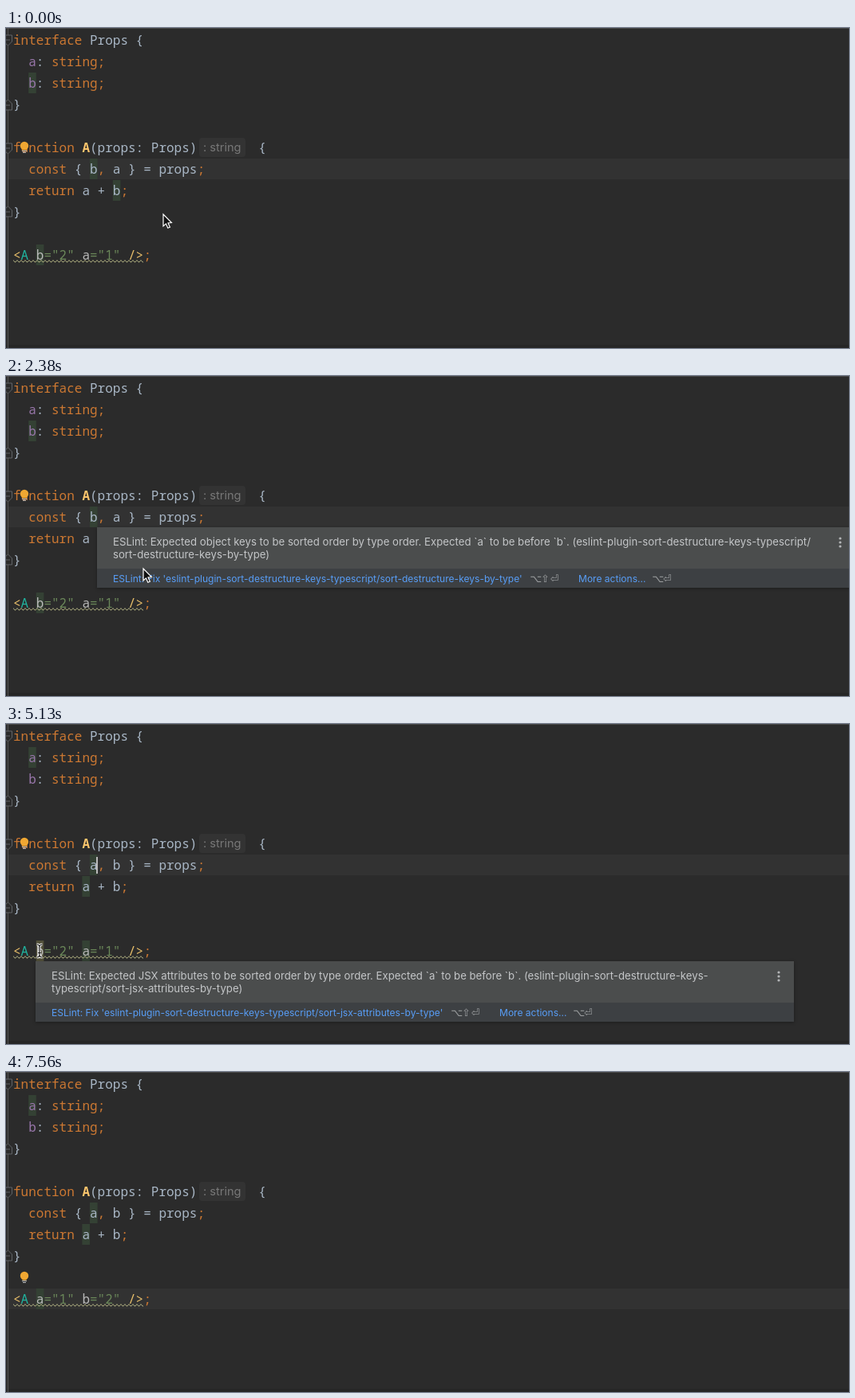
These frames come from a looping animation (1056x402 px, 7750 ms). An HTML page with a canvas:

```html
<!DOCTYPE html>
<html lang="en">
<head>
<meta charset="utf-8">
<title>Sorting keys by type</title>
<style>
html, body { margin: 0; width: 100%; height: 100%; overflow: hidden; background: #2b2b2b; }
canvas { display: block; }
</style>
</head>
<body>
<canvas id="stage" width="1056" height="402"></canvas>
<script>
const ctx = document.getElementById('stage').getContext('2d');
const LOOP = 7750, CELL = 9.6, ROW = 27, LEFT = 9;
const MONO = '16px "Noto Sans Mono", monospace';
const UI = 'Inter, sans-serif';
const C = {
  bg: '#2b2b2b', row: '#323232', text: '#a9b7c6', key: '#cc7832', field: '#9876aa',
  fn: '#ffc66d', str: '#6a8759', tag: '#e8bf6a', comp: '#20b5a0', attr: '#bababa',
  mark: '#344134', weak: '#52503a', link: '#589df6', press: '#c47a33', hint: '#787878'
};

// moments of the loop, in ms
const T = {
  beam: 120, lampOff: 940, popA: 1440, press1: 3440, closeA: 3560, fix1: 3690,
  popB: 5000, press2: 6380, closeB: 6500, fix2: 6620, away: 6810, lamp2: 7190, caretOff: 7560
};

// pointer hot spot: time, x, y
const PATH = [
  [60, 197, 234], [810, 119, 181], [1250, 112, 176], [2130, 112, 176], [2380, 172, 242],
  [2700, 179, 251], [3690, 179, 251], [4190, 38, 274], [4310, 31, 279], [4630, 42, 285],
  [5380, 42, 285], [6130, 122, 357], [6500, 122, 357], [6810, 126, 376]
];

const within = (t, a, b) => t >= a && t < b;

function pointer(t) {
  if (t <= PATH[0][0]) return PATH[0].slice(1);
  for (let i = 1; i < PATH.length; i++) {
    const [t0, x0, y0] = PATH[i - 1], [t1, x1, y1] = PATH[i];
    if (t <= t1) {
      const u = (t - t0) / (t1 - t0), e = u * u * (3 - 2 * u);
      return [x0 + (x1 - x0) * e, y0 + (y1 - y0) * e];
    }
  }
  return PATH[PATH.length - 1].slice(1);
}

function rect(x, y, w, h, color) {
  ctx.fillStyle = color;
  ctx.fillRect(x, y, w, h);
}

function text(str, x, y, color, font) {
  ctx.font = font;
  ctx.fillStyle = color;
  ctx.fillText(str, x, y);
}

function poly(points, fill, stroke, width) {
  ctx.beginPath();
  points.forEach(([x, y]) => ctx.lineTo(x, y));
  ctx.closePath();
  if (fill) { ctx.fillStyle = fill; ctx.fill(); }
  if (stroke) { ctx.strokeStyle = stroke; ctx.lineWidth = width; ctx.stroke(); }
}

function mark(col, row, color = C.mark) {
  rect(LEFT + col * CELL, row * ROW + 2, CELL, 26, color);
}

// tokens: alternating string and colour name, "!" makes it bold
function code(row, col, ...tokens) {
  for (let i = 0; i < tokens.length; i += 2) {
    const bold = tokens[i + 1].endsWith('!');
    text(tokens[i], LEFT + col * CELL, row * ROW + 21,
      C[tokens[i + 1].replace('!', '')], (bold ? 'bold ' : '500 ') + MONO);
    col += tokens[i].length;
  }
}

function fold(y, dir) {
  poly([[-3, y - 6 * dir], [7.5, y - 6 * dir], [7.5, y + 2 * dir], [2.5, y + 7 * dir], [-3, y + 2 * dir]],
    C.bg, '#606366', 1);
  rect(0, y - 0.5, 5, 1, '#606366');
}

function lamp(y) {
  ctx.fillStyle = '#f0a732';
  ctx.beginPath();
  ctx.arc(23, y - 1, 5.2, 0, 7);
  ctx.fill();
  rect(20.5, y + 2, 5, 2.5, '#f0a732');
  rect(20, y + 5, 6, 1, '#b8bcc0');
  rect(21, y + 7, 4, 1, '#b8bcc0');
}

function wave(x0, x1, y) {
  ctx.beginPath();
  for (let x = x0; x <= x1; x++) ctx.lineTo(x, y - 1.3 * Math.cos((x - x0) * Math.PI / 2.5));
  ctx.strokeStyle = '#aeae80';
  ctx.lineWidth = 1;
  ctx.stroke();
}

function editor(t) {
  const fixed = t >= T.fix1, done = t >= T.fix2;
  const [p, q] = fixed ? 'ab' : 'ba';
  const [m, n] = done ? 'ab' : 'ba';
  const value = { a: '="1"', b: '="2"' };

  rect(0, 0, 1056, 402, C.bg);
  rect(3, (done ? 10 : 6) * ROW + 2, 1053, 26, C.row);
  rect(0, 0, 1056, 1, '#484848');
  rect(0, 398, 1056, 4, '#262626');
  rect(2, 0, 1, 402, '#555555');
  fold(15, 1);
  fold(97, -1);
  fold(151, 1);
  fold(231, -1);

  mark(2, fixed ? 1 : 2);
  mark(10, 6);
  mark(fixed ? 9 : 13, 7);
  mark(3, 10, fixed && !done ? C.weak : C.mark);
  if (fixed && !done) mark(9, 10);

  code(0, 0, 'interface', 'key', ' Props {', 'text');
  code(1, 2, 'a', 'field', ': ', 'text', 'string;', 'key');
  code(2, 2, 'b', 'field', ': ', 'text', 'string;', 'key');
  code(3, 0, '}', 'text');
  code(5, 0, 'function ', 'key', 'A', 'fn!', '(props: Props)', 'text');
  ctx.fillStyle = '#333333';
  ctx.beginPath();
  ctx.roundRect(242, 138, 58, 24, 4);
  ctx.fill();
  text(': string', 247, 155, C.hint, '14.6px ' + UI);
  code(5, 32, '{', 'text');
  code(6, 2, 'const', 'key', ' { ' + p, 'text', ',', 'key', ' ' + q + ' } = props', 'text', ';', 'key');
  code(7, 2, 'return', 'key', ' a + b', 'text', ';', 'key');
  code(8, 0, '}', 'text');
  code(10, 0, '<', 'tag', 'A ', 'comp', m, 'attr', value[m] + ' ', 'str',
    n, 'attr', value[n], 'str', ' />', 'tag', ';', 'key');
  wave(9, 172, 293);

  if (within(t, T.fix1, T.fix2)) rect(113, 167, 2, 21, '#bbbbbb');
  if (within(t, T.fix2, T.caretOff)) rect(47, 275, 2, 21, '#bbbbbb');
  if (t >= T.lamp2) lamp(257);
  else if (!done && !within(t, T.lampOff, T.popA)) lamp(149);
}

// each key symbol is centred in its own cell
function keys(str, x, y) {
  ctx.textAlign = 'center';
  [...str].forEach((ch, i) => text(ch, x + 5.8 + i * 11.7, y, '#9a9c9e', '13px "DejaVu Sans", sans-serif'));
  ctx.textAlign = 'left';
}

function popup(x, y, lines, link, linkWidth, state, alpha) {
  ctx.save();
  ctx.globalAlpha = alpha;
  ctx.shadowColor = 'rgba(0,0,0,.35)';
  ctx.shadowBlur = 4;
  ctx.shadowOffsetY = 1;
  rect(x, y, 950, 76, '#4b4d4d');
  ctx.shadowColor = 'transparent';
  rect(x, y + 52, 950, 24, '#3d4043');
  lines.forEach((s, i) => text(s, x + 20, y + 23 + i * 16, '#c4c6c8', '13.2px ' + UI));
  const small = '12.05px ' + UI, color = state === 'press' ? C.press : C.link;
  text(link, x + 20, y + 69, color, small);
  if (state) rect(x + 20, y + 71, ctx.measureText(link).width, 1, color);
  keys('⌥⇧⏎', x + linkWidth + 31, y + 69);
  text('More actions...', x + linkWidth + 90, y + 69, C.link, small);
  keys('⌥⏎', x + linkWidth + 184, y + 69);
  ctx.fillStyle = '#b4b6b8';
  for (const dy of [14, 19, 24]) {
    ctx.beginPath();
    ctx.arc(x + 931, y + dy, 1.6, 0, 7);
    ctx.fill();
  }
  ctx.restore();
}

const cursors = {
  arrow() {
    poly([[0, 0], [0, 15], [3.4, 11.9], [5.8, 17.3], [8.4, 16.2], [6, 11], [10.4, 10.6]], '#111', '#fff', 1.2);
  },
  beam() {
    const draw = (color, width) => {
      ctx.strokeStyle = color;
      ctx.lineWidth = width;
      ctx.beginPath();
      for (const s of [-1, 1]) {
        ctx.moveTo(-3.5, 8 * s);
        ctx.quadraticCurveTo(0, 8 * s, 0, 5 * s);
        ctx.quadraticCurveTo(0, 8 * s, 3.5, 8 * s);
      }
      ctx.moveTo(0, -6);
      ctx.lineTo(0, 6);
      ctx.moveTo(-2, 2.5);
      ctx.lineTo(2, 2.5);
      ctx.stroke();
    };
    draw('#fff', 3.2);
    draw('#111', 1.2);
  },
  hand() {
    ctx.lineJoin = 'round';
    poly([[-1.6, 0.5], [0, -0.6], [1.6, 0.5], [2.2, 5], [4, 4.4], [5, 5.6], [6.8, 5.2], [7.6, 6.6],
      [9, 6.6], [9.6, 8], [8.8, 12], [7.6, 15.5], [0.8, 15.5], [-1.6, 12.2], [-4.4, 9.2],
      [-4, 7.6], [-2.4, 7.8], [-0.8, 9.2]], '#fff', '#111', 1.1);
    for (const x of [2.2, 4.2, 6.2]) rect(x, 10, 0.8, 3.5, '#111');
  }
};

function draw(t) {
  const [x, y] = pointer(t);
  const showA = within(t, T.popA, T.closeA), showB = within(t, T.popB, T.closeB);
  const hover = (showA && y > 247) || (showB && y > 350);
  const state = !hover ? '' : within(t, T.press1, T.closeA) || t >= T.press2 ? 'press' : 'hover';
  const fade = start => Math.min(1, 0.4 + (t - start) / 150);
  const plugin = 'eslint-plugin-sort-destructure-keys-typescript/';

  editor(t);
  if (showA) popup(114, 190, [
    'ESLint: Expected object keys to be sorted order by type order. Expected `a` to be before `b`. (' + plugin,
    'sort-destructure-keys-by-type)'
  ], "ESLint: Fix '" + plugin + "sort-destructure-keys-by-type'", 513, state, fade(T.popA));
  if (showB) popup(37, 298, [
    'ESLint: Expected JSX attributes to be sorted order by type order. Expected `a` to be before `b`. (eslint-plugin-sort-destructure-keys-',
    'typescript/sort-jsx-attributes-by-type)'
  ], "ESLint: Fix '" + plugin + "sort-jsx-attributes-by-type'", 491, state, fade(T.popB));

  if (t >= T.away) return;
  const overPopup = (showA && x > 113 && y > 190) || (showB && x > 37 && y > 298);
  ctx.save();
  ctx.translate(x, y);
  cursors[hover ? 'hand' : t < T.beam || overPopup ? 'arrow' : 'beam']();
  ctx.restore();
}

function tick() {
  draw(performance.now() % LOOP);
  requestAnimationFrame(tick);
}
tick();
</script>
</body>
</html>
```
